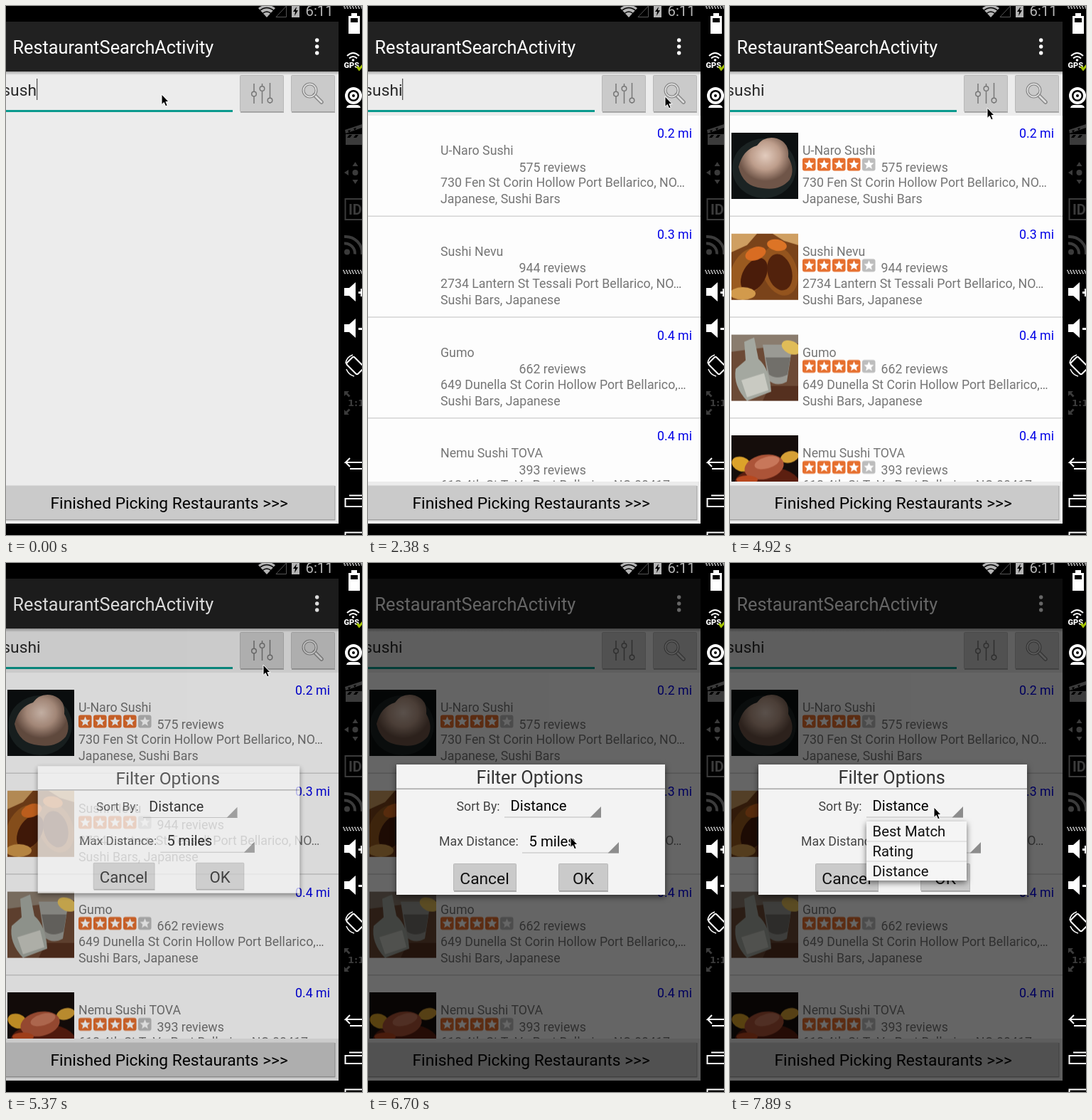
Recreate the animation shown at these times as an HTML page. Size 501x743 px, loop 8000 ms.

```html
<!DOCTYPE html>
<html lang="en">
<head>
<meta charset="utf-8">
<title>Restaurant search</title>
<style>
html, body { margin: 0; width: 100%; height: 100%; overflow: hidden; background: #000; }
svg { display: block; width: 501px; height: 743px; font-family: Roboto, sans-serif; }
.s { font-size: 17.75px; }
.m { font-size: 20.3px; }
.l { font-size: 22.8px; }
.xl { font-size: 25.3px; }
.end { text-anchor: end; }
.mid { text-anchor: middle; }
.line { fill: none; stroke: #fff; stroke-width: 2; }
.faint { fill: #3b3b3b; }
.faint.line { fill: none; stroke: #3b3b3b; }
.icon { fill: none; stroke: #777; stroke-width: 1.5; }
.button { fill: #cacaca; stroke: #b8b8b8; }

/* One shared 8 s timeline with hard steps: percent = ms / 80 */
.t { animation: 8s step-end infinite; }
#typed { animation-name: typed; }
#caret { animation-name: caret; }
#caretX { animation-name: caretX; }
#search { animation-name: press; }
#list { animation-name: list; }
.load0, .load1 { animation-name: load0; }
.load2 { animation-name: load2; }
.load3 { animation-name: load3; }
#dim { animation-name: dim; }
#dialog { animation-name: dialog; transform-origin: 229px 375px; }
#menu { animation-name: menu; }
#pointer { animation-name: pointer; }
.shadow { filter: drop-shadow(0 3px 4px rgba(0, 0, 0, .55)); }

@keyframes typed { 0% { opacity: 0 } 1.875% { opacity: 1 } }
@keyframes caretX { 0% { transform: translate(-5px, 0) } 1.875% { transform: none } }
@keyframes caret {
  0% { opacity: 1 } 9.125% { opacity: 0 } 14.75% { opacity: 1 } 33.5% { opacity: 0 }
  41% { opacity: 1 } 46.625% { opacity: 0 } 55.875% { opacity: 1 } 59.625% { opacity: 0 }
}
@keyframes press { 0% { fill: #cacaca } 14.75% { fill: #b6b6b6 } 29.75% { fill: #cacaca } }
@keyframes list { 0% { opacity: 0 } 29.75% { opacity: 1 } }
@keyframes load0 { 0% { opacity: 0 } 33.5% { opacity: 1 } }
@keyframes load2 { 0% { opacity: 0 } 35.375% { opacity: 1 } }
@keyframes load3 { 0% { opacity: 0 } 37.25% { opacity: 1 } }
@keyframes dim { 0% { opacity: 0 } 67.125% { opacity: .14 } 68.875% { opacity: .45 } 70.75% { opacity: .6 } }
@keyframes dialog {
  0% { opacity: 0; transform: scale(.9) }
  67.125% { opacity: .76; transform: scale(.975) }
  68.875% { opacity: .97; transform: scale(.997) }
  70.75% { opacity: 1; transform: none }
}
@keyframes menu { 0% { opacity: 0 } 98.625% { opacity: 1 } }
@keyframes pointer {
  0% { transform: translate(219px, 124px) }
  5.5% { transform: translate(238px, 126px) }
  7.375% { transform: translate(305px, 128px) }
  9.125% { transform: translate(385px, 128px) }
  11% { transform: translate(418px, 127px) }
  41% { transform: translate(412px, 150px) }
  42.875% { transform: translate(398px, 190px) }
  44.75% { transform: translate(382px, 222px) }
  46.625% { transform: translate(366px, 230px) }
  48.375% { transform: translate(354px, 212px) }
  50.25% { transform: translate(350px, 196px) }
  59.625% { transform: translate(358px, 160px) }
  61.5% { transform: translate(362px, 143px) }
  72.625% { transform: translate(352px, 180px) }
  74.375% { transform: translate(326px, 270px) }
  76.25% { transform: translate(303px, 350px) }
  78.125% { transform: translate(292px, 390px) }
  80% { transform: translate(290px, 395px) }
  83.75% { transform: translate(285px, 385px) }
  85.625% { transform: translate(284px, 374px) }
  87.5% { transform: translate(284px, 362px) }
  89.375% { transform: translate(285px, 352px) }
  91.25% { transform: translate(286px, 346px) }
  93% { transform: translate(287px, 343px) }
}
</style>
</head>
<body>
<svg viewBox="0 0 501 743">
  <defs>
    <linearGradient id="barShadow" x2="0" y2="1">
      <stop stop-color="#a8a8a8"/><stop offset="1" stop-color="#ececec"/>
    </linearGradient>
    <radialGradient id="dough" cx=".5" cy=".35">
      <stop stop-color="#e2cbbd"/><stop offset=".55" stop-color="#bd9d8b"/><stop offset="1" stop-color="#6f5548"/>
    </radialGradient>
    <clipPath id="listClip"><path d="M0 154H468V668H0z"/></clipPath>
    <clipPath id="photoClip"><path d="M0 0H94V93H0z"/></clipPath>
    <path id="star" d="M0-7 2-2.3 7-2 3.2 1.4 4.4 6.3 0 3.6-4.4 6.3-3.2 1.4-7-2-2-2.3z" fill="#fff"/>
    <path id="hatch" d="M474 0h27M475 2h26M476 4h25" stroke="#ccc" stroke-width="1.6" stroke-dasharray="2 2"/>
    <path id="speaker" d="M476-6h7l9-8v27l-9-8h-7z" fill="#fff"/>
  </defs>

  <rect width="501" height="743"/>

  <!-- status bar -->
  <g fill="#b4b4b4">
    <path d="M355 3Q367-6 379 3L367 16z"/>
    <path d="M357 6.500q10-8 20 0M361 10.500q6-5 12 0" fill="none" stroke="#000" stroke-width="1.300"/>
    <path d="M380 15.500H394.500V0z" fill="none" stroke="#555"/>
    <path d="M402 0h11v16h-11z"/>
    <path d="M409 1l-5 7h3l-1 6 5-8h-3z" fill="#000"/>
    <text x="421.500" y="14" class="m">6:11</text>
  </g>

  <!-- app -->
  <path d="M0 92H468V727H0z" fill="#ececec"/>
  <path d="M0 22H468V92H0z" fill="#212121"/>
  <path d="M0 92H468V97H0z" fill="url(#barShadow)"/>
  <text x="9.500" y="67" class="xl" fill="#fff">RestaurantSearchActivity</text>
  <g fill="#fff"><circle cx="437.700" cy="48" r="2.700"/><circle cx="437.700" cy="57" r="2.700"/><circle cx="437.700" cy="66" r="2.700"/></g>

  <g class="l" fill="#2a2a2a">
    <text x="-5.700" y="125.500">sush</text>
    <text id="typed" class="t" x="43" y="125.500">i</text>
  </g>
  <g id="caretX" class="t"><path id="caret" class="t" d="M48 102h1.300v30H48z" fill="#555"/></g>
  <path d="M0 146H319V149H0z" fill="#0b9a8e"/>

  <rect class="button" x="329.500" y="97.500" width="61" height="51" rx="1"/>
  <rect id="search" class="button t" x="401.500" y="97.500" width="61" height="51" rx="1"/>
  <path d="M330 149h61M402 149h61" stroke="#999" stroke-width="1.300"/>
  <g class="icon">
    <path d="M349 109v11m0 7v10M360.500 109v4m0 7v17M371.500 108v21m0 7v1"/>
    <circle cx="349" cy="123.500" r="3.300"/><circle cx="360.500" cy="116" r="3.300"/><circle cx="371.500" cy="132.500" r="3.300"/>
  </g>
  <g fill="none">
    <path d="M434 125l10 10" stroke="#858585" stroke-width="5.500" stroke-linecap="round"/>
    <path d="M434 125l10 10" stroke="#ddd" stroke-width="2.800" stroke-linecap="round"/>
    <circle cx="427.500" cy="118.500" r="9" stroke="#858585" stroke-width="4"/>
    <circle cx="427.500" cy="118.500" r="9" stroke="#ddd" stroke-width="1.800"/>
  </g>

  <g clip-path="url(#listClip)"><g id="list" class="t">
    <path d="M0 154H468V668H0z" fill="#fdfdfd"/>
    <g id="rows"></g>
  </g></g>

  <path d="M0 674H463.500V722.500H0z" fill="#a0a0a0"/>
  <path d="M0 673.500H462.500V721H0z" fill="#cacaca"/>
  <text x="62.500" y="706" class="l">Finished Picking Restaurants &gt;&gt;&gt;</text>

  <path id="dim" class="t" d="M0 22H468V727H0z"/>

  <g id="dialog" class="t">
    <path class="shadow" d="M40 283H418V466H40z" fill="#f3f3f3"/>
    <text x="152.500" y="309.500" class="xl" fill="#333">Filter Options</text>
    <path d="M40 316.500H418V318H40z" fill="#a5a5a5"/>
    <g class="s" fill="#444"><text x="124.500" y="347.500">Sort By:</text><text x="100" y="397">Max Distance:</text></g>
    <g class="m"><text x="200.500" y="348">Distance</text><text x="226.500" y="397.500">5 miles</text></g>
    <path d="M192 356.500h136v1H192zM217 406.500h136v1H217z" fill="#bbb"/>
    <path d="M328 342v15.500h-15.500zM353 392v15.500h-15.500z" fill="#8c8c8c"/>
    <rect class="button" x="120.500" y="422.500" width="88" height="38" rx="1"/>
    <rect class="button" x="268.500" y="422.500" width="69" height="38" rx="1"/>
    <path d="M121 461h88M269 461h69" stroke="#999" stroke-width="1.300"/>
    <g class="l mid" fill="#111"><text x="164" y="451">Cancel</text><text x="303" y="451">OK</text></g>
  </g>

  <g id="menu" class="t">
    <path class="shadow" d="M192 363H333V446H192z" fill="#f5f5f5"/>
    <path d="M192 390.500h141v1H192zM192 418.500h141v1H192z" fill="#d2d2d2"/>
    <g class="m" fill="#111">
      <text x="200.500" y="384">Best Match</text><text x="200.500" y="412">Rating</text><text x="200.500" y="440">Distance</text>
    </g>
  </g>

  <!-- device toolbar -->
  <path d="M468 0H501V743H468z"/>
  <use href="#hatch" y="-1"/>
  <use href="#hatch" y="371.500"/>
  <g fill="#fff">
    <path d="M486 10h8v4h4v25h-16V14h4z"/><path d="M485 17h10v6h-10z" fill="#000"/>
    <path class="line" d="M480 70q8.500-8 17 0M483 73.500q5.500-5 11 0"/><circle cx="488.500" cy="76" r="1.800"/>
    <text x="475.500" y="87" font-size="11" font-weight="900">GPS</text>
    <path d="M494 85l3 4 6-7" fill="none" stroke="#a4c400" stroke-width="3"/>
    <circle cx="489" cy="126" r="12"/><circle cx="489" cy="126" r="8" fill="#000"/><circle cx="489" cy="126" r="5.500"/>
    <circle cx="489" cy="126" r="2" fill="#000"/><path d="M479 143q1-4 5-4h10q4 0 5 4z"/>
    <use href="#speaker" y="402"/><path d="M496 401h5v3h-5zM499 397h2v11h-2z"/>
    <use href="#speaker" y="453"/><path d="M496 452h5v3h-5z"/>
  </g>
  <g class="faint">
    <path d="M478 180h23v15h-23zM477 174l24-8v5l-23 8z"/>
    <path d="M481 175l4-1-2 4zM489 172l4-1-2 4zM483 181l4 0-3 4h-4zM492 181h4l-3 4h-4z" fill="#000"/>
    <circle cx="491.500" cy="234" r="4"/><path d="M476 234l6-4v8zM491.500 219l4 6h-8zM491.500 250l4-6h-8z"/>
    <text x="482" y="293" font-size="20" font-weight="700">ID</text>
    <circle cx="480" cy="345.500" r="4"/>
    <path d="M476 541h7l-2.500 2.500 4 4-2 2-4-4-2.500 2.500zM476 574h7l-2.500-2.500 4-4-2-2-4 4-2.500-2.500z"/>
    <text x="481" y="562" font-size="13" font-weight="700" font-family="DejaVu Sans, sans-serif">1:1</text>
  </g>
  <path class="faint line" d="M505 271H477.500V300H505"/>
  <path class="faint line" style="stroke-width:4" d="M476 333.500a14 14 0 0 1 15 15M476 324a23 23 0 0 1 25 25"/>
  <g class="line">
    <rect x="484" y="494" width="15" height="22" rx="2.500" transform="rotate(-45 491.500 505)"/>
    <path d="M478 502q1-9 10-12M479 510q3 8 11 10" stroke-width="1.500"/>
    <path d="M501 641H478l6-6M478 641l6 6M484 650h17"/>
    <path d="M505 692H477.500V703H505M483 687.500h18"/>
    <path d="M505 739.500H477.500V746"/>
  </g>

  <path id="pointer" class="t" d="M0 0V14.500L3.300 11.500 5.600 16.800 8.200 15.700 5.900 10.500H10z" stroke="#fff"/>
</svg>
<script>
const rows = [
  ["0.2", "U-Naro Sushi", 575, "730 Fen St Corin Hollow Port Bellarico, NO…", "Japanese, Sushi Bars"],
  ["0.3", "Sushi Nevu", 944, "2734 Lantern St Tessali Port Bellarico, NO…", "Sushi Bars, Japanese"],
  ["0.4", "Gumo", 662, "649 Dunella St Corin Hollow Port Bellarico,…", "Sushi Bars, Japanese"],
  ["0.4", "Nemu Sushi TOVA", 393, "618 4th St ToVa Port Bellarico, NO 00417", "Sushi Bars, Japanese"],
];

const shape = (fill, d) => `<path fill="${fill}" d="${d}"/>`;
const oval = (fill, x, y, rx, ry, turn = 0) =>
  `<ellipse fill="${fill}" cx="${x}" cy="${y}" rx="${rx}" ry="${ry}" transform="rotate(${turn} ${x} ${y})"/>`;
const backdrop = fill => shape(fill, "M0 0H94V93H0z");

const photos = [
  backdrop("#0c1011") + oval("#1b2323", 46, 50, 45, 42) +
    shape("url(#dough)", "M10 48Q16 24 36 18 46 4 64 8 82 14 80 34 90 52 82 66 68 82 44 78 16 76 10 48z"),
  backdrop("#7a431a") + shape("#cf9f62", "M0 0H36L22 16 0 26zM58 0H94V16L74 10z") +
    oval("#9a5a20", 24, 54, 24, 36, 25) + oval("#94541e", 68, 52, 24, 36, -20) +
    oval("#4a1c0a", 32, 58, 16, 26, 30) + oval("#52220c", 68, 54, 17, 26, -15) +
    oval("#d96c22", 34, 28, 15, 9, -20) + oval("#dc7426", 64, 16, 14, 8, 10) + oval("#d29a4c", 16, 84, 18, 9),
  backdrop("#6c4a36") + shape("#8a7c6e", "M0 0H94V12L0 24z") + shape("#55301f", "M54 72H94V93H44z") +
    shape("#9a9a94", "M44 14H86L78 66Q64 74 52 64z") + shape("#716f6a", "M48 32H83L79 56Q64 64 53 56z") +
    shape("#a4a8a0", "M18 10L32 4 38 34Q54 48 56 80L22 93Q2 72 6 48L20 36z") +
    shape("#c9cac2", "M14 64L46 54 52 78 22 88z") + oval("#e0bc58", 84, 18, 14, 9, 25),
  backdrop("#150d0b") + oval("#5c1f10", 50, 68, 46, 24) + oval("#dca22a", 14, 40, 14, 10, 20) +
    oval("#d6a036", 82, 30, 13, 8, -15) + oval("#ac5438", 46, 44, 28, 17, -12) +
    oval("#c8775a", 50, 38, 18, 8, -16) + oval("#b8481f", 22, 62, 15, 6),
];

const stars = [0, 1, 2, 3, 4].map(i => `<g transform="translate(${111.5 + 21 * i} 222.5)">
  <rect x="-9.500" y="-9" width="18.500" height="18" rx="3" fill="${i < 4 ? "#e66f2e" : "#bdbdbd"}"/><use href="#star"/></g>`).join("");

document.getElementById("rows").innerHTML = rows.map(([miles, name, reviews, address, kind], i) => `
  <g transform="translate(0 ${141.8 * i})" class="s" fill="#767676">
    <text x="456" y="185" class="end" fill="#0000e6">${miles} mi</text>
    <text x="102" y="209">${name}</text>
    <text x="212.500" y="232.500">${reviews} reviews</text>
    <text x="102" y="254">${address}</text>
    <text x="102" y="277">${kind}</text>
    <path d="M0 294.500H468V296H0z" fill="#d4d4d4"/>
    <g class="t load${i}">${stars}<g transform="translate(2 178)" clip-path="url(#photoClip)">${photos[i]}</g></g>
  </g>`).join("");
</script>
</body>
</html>
```
